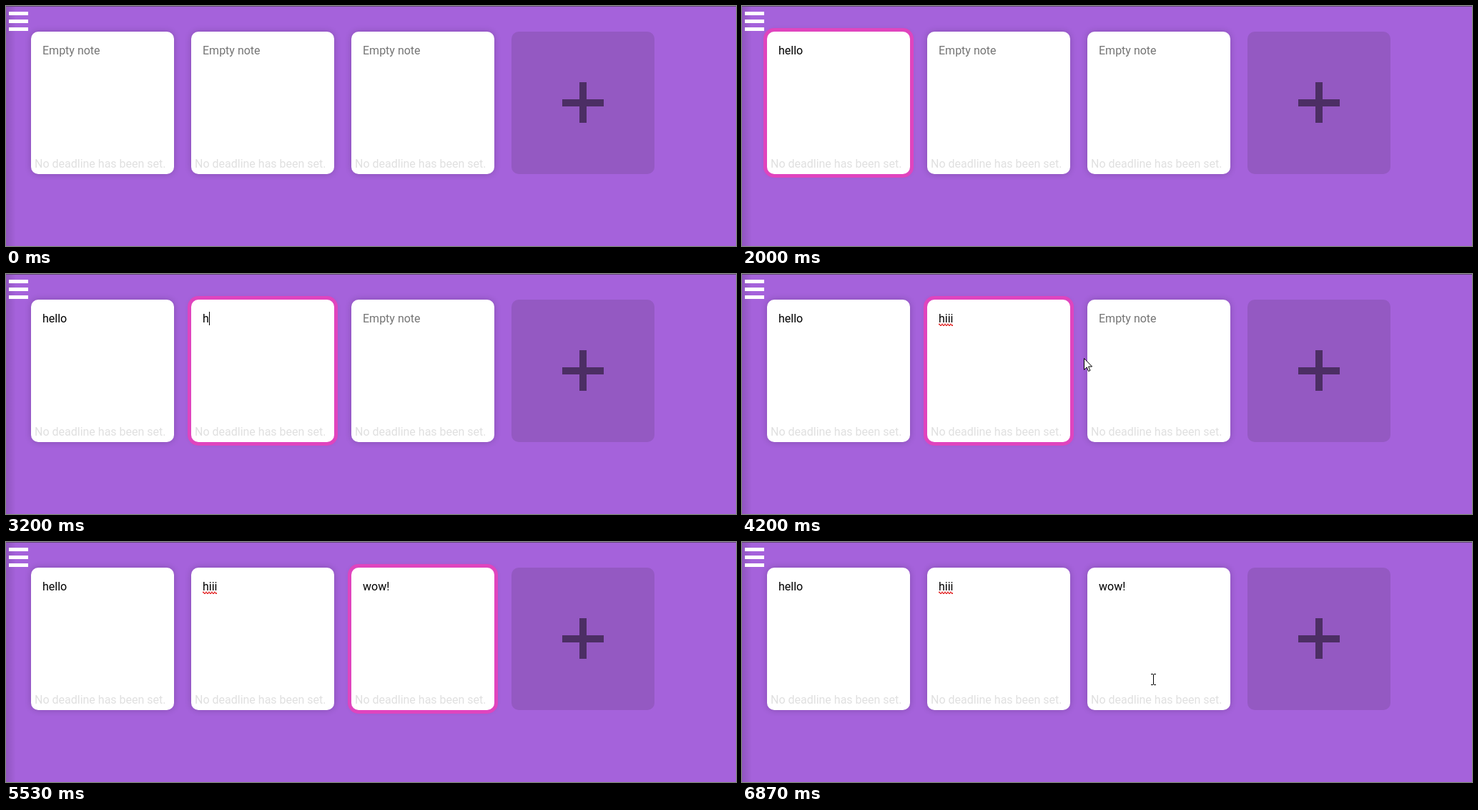
Write an HTML page that moves like this. It is 1021 by 337 pixels and loops after 6.94 s.

```html
<!DOCTYPE html>
<html lang="en">
<head>
<meta charset="utf-8">
<title>Notes</title>
<style>
  html, body { margin: 0; width: 100%; height: 100%; overflow: hidden; }
  body { background: #a562db; font: 16px/19px Roboto, sans-serif; }
  #stage { position: absolute; left: 0; top: 0; width: 1021px; height: 337px; overflow: hidden; background: #a562db; }
  #stage div, #stage svg { position: absolute; }
  .edge { left: 0; top: 0; width: 14px; height: 337px; background: linear-gradient(90deg, rgba(0,0,0,.13), rgba(0,0,0,0)); }
  .top { left: 0; top: 0; width: 100%; height: 1px; background: #624875; }
  .bar { left: 4px; width: 27px; height: 5px; background: #fff; }
  .card { top: 36px; width: 200px; height: 200px; border-radius: 10px; background: #fff; }
  .text { left: 16px; top: 17px; white-space: pre; color: #000; }
  .text.empty { color: #757575; }
  .due { left: 5px; top: 176px; white-space: pre; color: #e0e0e0; }
  .caret { top: 17px; width: 1px; height: 19px; background: #000; }
  .wave { left: 16px; top: 32px; height: 5px; overflow: hidden; }
  .add { left: 707px; background: #9459c2; }
  .add div { background: #4c2e64; }
  #pointer { left: 0; top: 0; }
</style>
</head>
<body>
<div id="stage">
  <div class="edge"></div>
  <div class="top"></div>
  <div class="bar" style="top:8px"></div>
  <div class="bar" style="top:19px"></div>
  <div class="bar" style="top:30px"></div>
  <div class="card add">
    <div style="left:71px;top:95px;width:58px;height:10px"></div>
    <div style="left:95px;top:71px;width:10px;height:57px"></div>
  </div>
  <svg id="pointer" width="1021" height="337" style="z-index:2">
    <path id="beam" d="M-3-7.5h3M1-7.5h3M.5-7v14M-3 7.5h3M1 7.5h3" fill="none" stroke="#000"/>
    <path id="arrow" d="M.5.5v16l3.7-3.6 2.4 5.6 2.4-1-2.4-5.5h5z" fill="#fff" stroke="#000"/>
  </svg>
</div>
<script>
const LOOP = 6940, FPS = 15, LAST = 103;
const $ = id => document.getElementById(id);

// All times below are ticks of 1/15 s.
const notes = [
  { x: 35, typed: [[22, 'h'], [24, 'he'], [25, 'hel'], [27, 'hell'], [29, 'hello']],
    focus: 14, blurred: 45, caret: [[14, 30], [38, 41]] },
  { x: 259, typed: [[48, 'h'], [49, 'hi'], [52, 'hii'], [53, 'hiii']], misspelt: 50,
    focus: 41, blurred: 71, caret: [[41, 57], [65, 67]] },
  { x: 483, typed: [[74, 'w'], [76, 'wo'], [77, 'wow'], [81, 'wow!']],
    focus: 67, blurred: 103, caret: [[67, 83], [90, 98]] }
];

// tick, x, y; a lone tick hides the pointer
const path = [
  [0], [9, 176, 261], [10, 170, 216], [11, 162, 178], [12, 154, 148], [13, 150, 130], [14, 149, 123],
  [22], [37, 153, 122], [38, 186, 118], [39, 246, 113], [40, 318, 109], [41, 352, 108],
  [48], [62, 392, 110], [63, 478, 118], [64, 556, 128], [65, 582, 132],
  [74], [91, 432, 222], [92, 345, 284], [93, 262, 318], [94, 315, 321],
  [101, 372, 296], [102, 505, 229], [103, 575, 193]
];

const EASE = [0, .41, .8, .96, 1];
const SHADOW = '0 0 10px rgba(0,0,0,.2)';
const latest = (steps, f) => steps.filter(s => s[0] <= f).pop();

function add(parent, cls) {
  const el = document.createElement('div');
  el.className = cls;
  parent.append(el);
  return el;
}

for (const n of notes) {
  n.card = add($('stage'), 'card');
  n.card.style.left = n.x + 'px';
  n.text = add(n.card, 'text');
  n.due = add(n.card, 'due');
  n.due.textContent = 'No deadline has been set.';
  n.wave = add(n.card, 'wave');
  n.wave.innerHTML = '<svg width="40" height="5"><path d="M0 3.5' +
    'q1-3 2 0t2 0'.repeat(10) + '" fill="none" stroke="#e01010" stroke-width="1.1"/></svg>';
  n.bar = add(n.card, 'caret');
}

function ring(n, f) {
  if (f < n.focus || f >= n.blurred) return SHADOW;
  const p = EASE[Math.min(4, f - n.focus)];
  const out = f === n.blurred - 1 ? .5 : 1;
  const k = .4 + .6 * p;
  const rgb = [224, 68, 190].map(c => Math.round(c * k));
  return `0 0 0 ${5 * p * out}px rgba(${rgb},${out}), ${SHADOW}`;
}

function drawNote(n, f) {
  const step = latest(n.typed, f);
  n.text.textContent = step ? step[1] : 'Empty note';
  n.text.classList.toggle('empty', !step);
  const width = step ? Math.round(n.text.getBoundingClientRect().width) : 0;
  n.bar.style.left = 16 + width + 'px';
  n.bar.hidden = !n.caret.some(([a, b]) => f >= a && f < b);
  n.wave.style.width = (f >= n.misspelt ? width : 0) + 'px';
  n.card.style.boxShadow = ring(n, f);
}

function drawPointer(f) {
  const [, x, y] = latest(path, f);
  const shown = x !== undefined;
  const over = shown && y > 36 && y < 236 && notes.some(n => x >= n.x && x < n.x + 200);
  for (const [id, on] of [['beam', over], ['arrow', shown && !over]]) {
    $(id).style.display = on ? '' : 'none';
    if (on) $(id).setAttribute('transform', `translate(${x} ${y})`);
  }
}

let drawn = -1;
function tick() {
  const t = performance.now() % LOOP;
  const f = Math.min(LAST, Math.floor((t + 4) * FPS / 1000));
  if (f !== drawn) {
    notes.forEach(n => drawNote(n, f));
    drawPointer(f);
    drawn = f;
  }
  requestAnimationFrame(tick);
}
tick();
</script>
</body>
</html>
```
